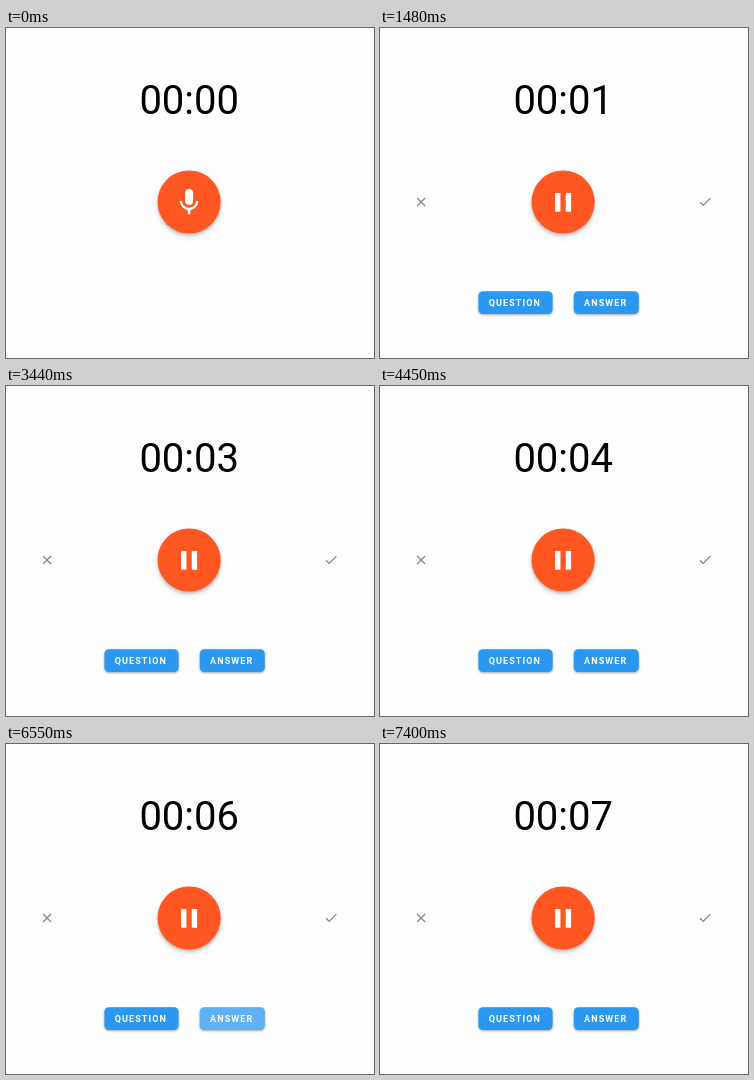
Write an HTML page that moves like this. It is 368 px wide and 330 px high and loops after 8 s.

```html
<!DOCTYPE html>
<html lang="en">
<head>
<meta charset="utf-8">
<title>Voice recorder</title>
<style>
  html, body { margin: 0; width: 100%; height: 100%; overflow: hidden; background: #fefefe; }
  svg { display: block; width: 100%; height: 100%; }
  text { font-family: Roboto, sans-serif; }
  #clock { font-size: 40px; fill: #000; }
  .label { font-size: 9px; font-weight: 700; letter-spacing: 1.1px; fill: #fff; }
  .icon { fill: #858585; }
  .fab { filter: drop-shadow(0 2px 1.6px rgba(0,0,0,.2)) drop-shadow(0 3px 3px rgba(0,0,0,.1)); }
  .box { fill: #2a98f0; filter: drop-shadow(0 1.2px .8px rgba(0,0,0,.34)); }
  .box.raised { filter: drop-shadow(0 2.4px 1.6px rgba(0,0,0,.38)); }
</style>
</head>
<body>
<svg viewBox="0 0 368 330">
  <text id="clock" x="133.4" y="85.6">00:00</text>
  <circle class="fab" cx="183.1" cy="174" r="31.6" fill="#ff5722"/>
  <g transform="translate(167.1 158.3) scale(1.333)" fill="#fff">
    <path id="mic" d="M12 14a3 3 0 0 0 3-3V5a3 3 0 0 0-6 0v6a3 3 0 0 0 3 3zm5.3-3a5.3 5.1 0 0 1-10.6 0H5a7 7 0 0 0 6 6.7V21h2v-3.300a7 7 0 0 0 6-6.700z"/>
    <path id="pause" d="M6 19h4V5H6zM14 5v14h4V5z"/>
  </g>
  <g id="controls">
    <path class="icon" transform="translate(33.400 166.300) scale(.64)" d="M19 6.400 17.600 5 12 10.600 6.400 5 5 6.400 10.600 12 5 17.600 6.400 19 12 13.400 17.600 19 19 17.600 13.400 12z"/>
    <path class="icon" transform="translate(317.400 166.100) scale(.64)" d="M9 16.200 4.800 12l-1.400 1.400L9 19 21 7l-1.400-1.400z"/>
  </g>
</svg>
<script>
const LOOP = 8000, START = 500;
const TICKS = [1480, 2430, 3440, 4450, 5460, 6390, 7400];
const NS = 'http://www.w3.org/2000/svg';
const $ = id => document.getElementById(id);

function add(parent, tag, attrs, text = '') {
  const el = document.createElementNS(NS, tag);
  for (const key in attrs) el.setAttribute(key, attrs[key]);
  el.textContent = text;
  parent.append(el);
  return el;
}

// Ripple steps: [time, radius, white opacity, raised]
function makeButton(id, x, width, label, cx, steps) {
  const shape = { x, y: 263.2, width, height: 22.9, rx: 4.5 };
  const box = add($('controls'), 'rect', { ...shape, class: 'box' });
  const clip = add($('controls'), 'clipPath', { id });
  add(clip, 'rect', shape);
  const wrap = add($('controls'), 'g', { 'clip-path': `url(#${id})` });
  const ripple = add(wrap, 'circle', { cx, cy: 274.7, fill: '#fff' });
  add($('controls'), 'text', { class: 'label', x: x + 10.3, y: 278 }, label);
  return t => {
    const [, r, alpha, raised] = steps.findLast(s => t >= s[0]) || [0, 0, 0, false];
    ripple.setAttribute('r', r);
    ripple.setAttribute('fill-opacity', alpha);
    box.classList.toggle('raised', raised);
  };
}

const buttons = [
  makeButton('question', 98.4, 74.2, 'QUESTION', 133, [
    [2810, 33.5, .24, true], [2890, 60, .24, false],
    [3040, 60, .12, false], [3120, 0, 0, false]
  ]),
  makeButton('answer', 193.800, 65, 'ANSWER', 226, [
    [6390, 14, .2, true], [6470, 29, .24, true], [6550, 60, .24, false],
    [6700, 60, .12, false], [6770, 0, 0, false]
  ])
];

function show(el, on) {
  el.style.display = on ? '' : 'none';
}

function draw(t) {
  const seconds = TICKS.filter(tick => t >= tick).length;
  const active = t >= START;
  $('clock').textContent = '00:0' + seconds;
  show($('mic'), !active);
  show($('pause'), active);
  show($('controls'), active);
  buttons.forEach(update => update(t));
}

const origin = performance.now();
function frame() {
  draw((performance.now() - origin) % LOOP);
  requestAnimationFrame(frame);
}
frame();
</script>
</body>
</html>
```
